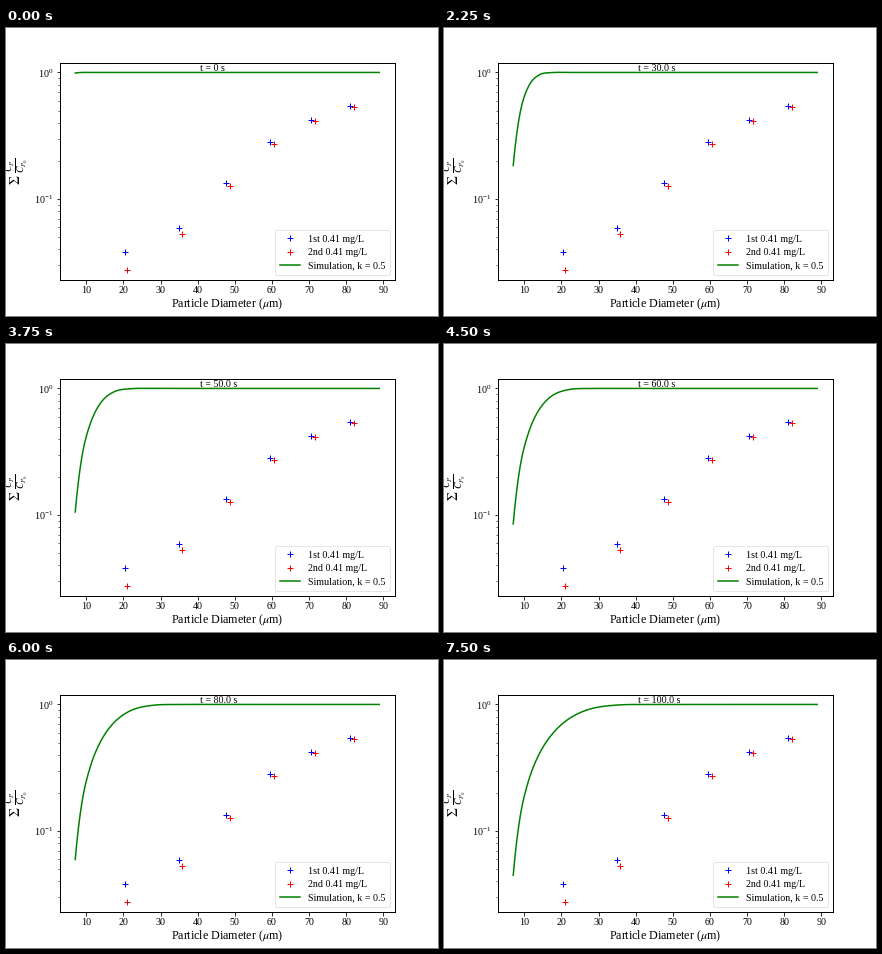
Animation, 432 px wide and 288 px high, one loop 8 s. Source, as a matplotlib script:

```python
import numpy as np
import matplotlib.pyplot as plt
from matplotlib.animation import FuncAnimation
from matplotlib.ticker import MultipleLocator

plt.rcParams.update({
    "font.family": "Liberation Serif",
    "mathtext.fontset": "stix",
    "font.size": 10,
    "axes.linewidth": 1.0,
})

TICK_MS = 250
TICKS_PER_STEP = 3
FRAMES = 32
STEP_S = 10.0
STEPS = (FRAMES - 1) // TICKS_PER_STEP + 1

RATE = 0.1037   # collision rate, 1/s
DT = 0.1        # integration step, s
BINS = 12       # each bin doubles the particle volume
D_MIN = 7.0


def collide(mass):
    """One Euler step: equal particles merge and move up one bin."""
    flux = RATE * DT * mass ** (5 / 3)
    flux[-1] = 0
    grown = mass - flux
    grown[1:] += flux[:-1]
    return grown


def smooth(y, x):
    """Cubic Hermite curve through y at 0, 1, 2, ..."""
    slope = np.gradient(y, edge_order=2)
    i = np.minimum(x.astype(int), len(y) - 2)
    s = x - i
    return (y[i] * (1 + 2 * s) * (1 - s) ** 2 + slope[i] * s * (1 - s) ** 2
            + y[i + 1] * s ** 2 * (3 - 2 * s) - slope[i + 1] * s ** 2 * (1 - s))


def simulate():
    """Cumulative mass over the bins, one smooth curve per time step."""
    mass = np.zeros(BINS)
    mass[0] = 1
    mass = collide(mass)
    curves = []
    for _ in range(STEPS):
        curves.append(10 ** smooth(np.log10(np.cumsum(mass)), level))
        for _ in range(round(STEP_S / DT)):
            mass = collide(mass)
    return curves


level = np.linspace(0, BINS - 1, 300)
diam = D_MIN * 2 ** (level / 3)
curves = simulate()

# measured series: the second lies slightly right of and below the first
n = np.arange(6)
d1 = (50.7 + 50.45 * n) ** (1 / 1.3)
y1 = np.array([0.0381, 0.0586, 0.1328, 0.280, 0.418, 0.545])
d2 = d1 + 1.13 - 0.6 * np.exp(-n)
y2 = y1 * 10 ** (-0.142 * (n + 1) ** -1.75)

fig, ax = plt.subplots(figsize=(6, 4), dpi=72)
fig.subplots_adjust(left=0.125, right=0.9, bottom=0.125, top=0.88)

ax.plot(d1, y1, "b+", label="1st 0.41 mg/L")
ax.plot(d2, y2, "r+", label="2nd 0.41 mg/L")
curve, = ax.plot(diam, curves[0], color="green",
                 label="Simulation, k = 0.5")

ax.set_yscale("log")
ax.set_xlim(2.9, 93.1)
ax.set_ylim(10 ** -1.6397, 10 ** 0.0781)
ax.xaxis.set_major_locator(MultipleLocator(10))
ax.tick_params(axis="x", pad=2.5)
ax.set_xlabel(r"Particle Diameter ($\mu$m)", fontsize=12, labelpad=2)
ax.set_ylabel(r"$\Sigma\ \frac{C_P}{C_{P_0}}$", fontsize=14)
ax.legend(loc="lower right", labelspacing=0.45, borderpad=0.45,
          edgecolor="0.88")
clock = fig.text(0.45, 0.85, "t = 0 s")


def update(i):
    step = i // TICKS_PER_STEP
    curve.set_ydata(curves[step])
    clock.set_text(f"t = {step * STEP_S} s" if step else "t = 0 s")
    return curve, clock


anim = FuncAnimation(fig, update, frames=FRAMES, interval=TICK_MS,
                     repeat=True, repeat_delay=0)
plt.show()
```
